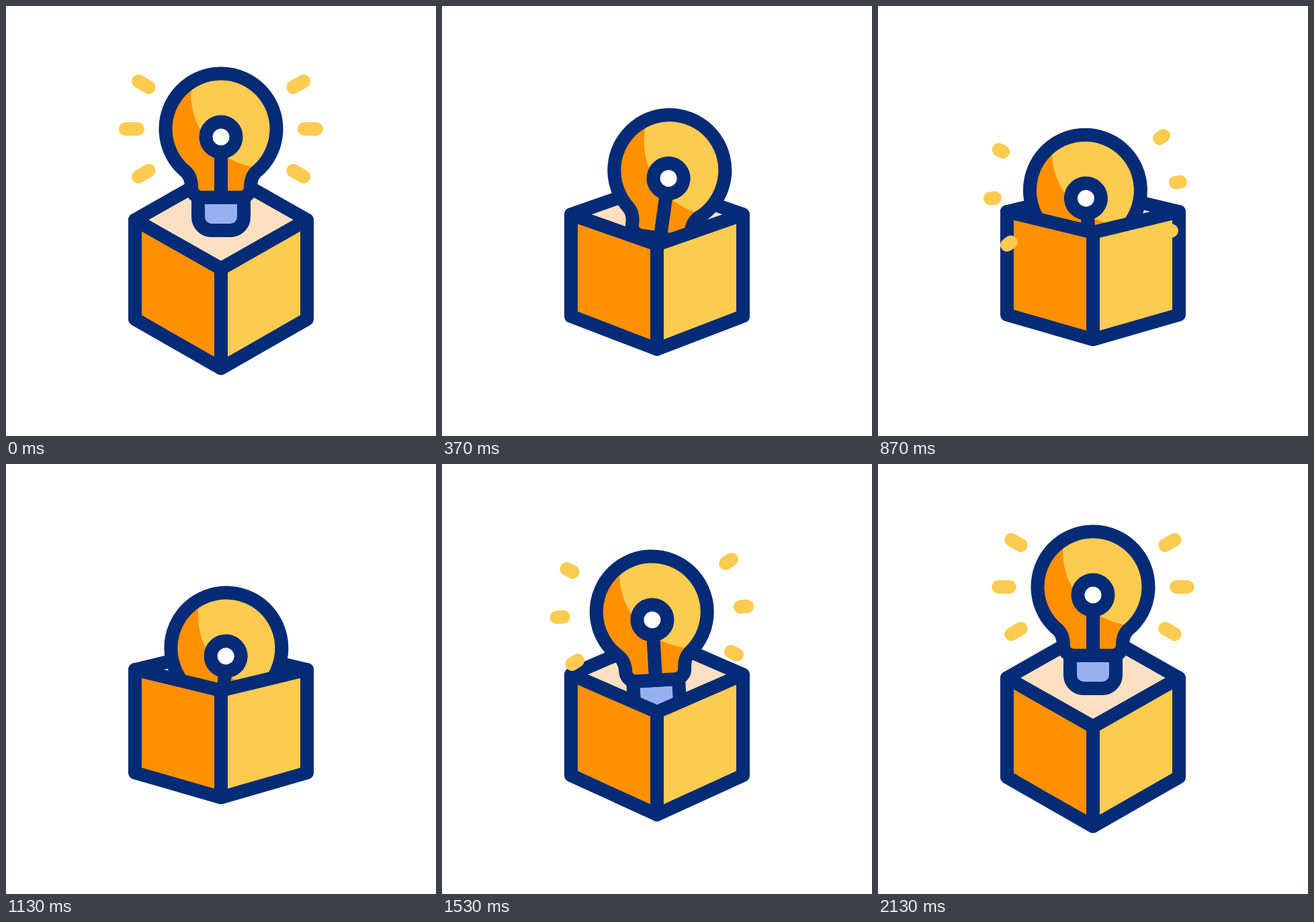
These frames come from a looping animation (640x640 px, 2170 ms). An HTML page:

```html
<!DOCTYPE html>
<html lang="en">
<head>
<meta charset="utf-8">
<title>Idea box</title>
<style>
  html, body { margin: 0; width: 100%; height: 100%; overflow: hidden; background: #fff; }
  svg { display: block; width: 100%; height: 100%; }
  .line { stroke: #042b76; stroke-width: 20; stroke-linejoin: round; stroke-linecap: round; }
  .none { fill: none; }
  .yellow { fill: #fdcb50; }
  .orange { fill: #ff9100; }
  .peach { fill: #fde0c2; }
  .blue { fill: #96b0f1; }
  .white { fill: #fff; }
  #rays { stroke: #fdcb50; stroke-width: 20; stroke-linecap: round; }
</style>
</head>
<body>
<svg viewBox="0 0 640 640">
  <defs>
    <path id="glass" d="M267 246.2A82.5 82.5 0 1 1 373 246.2C368 250.5 364 259 364 270A15 15 0 0 1 349 285H291A15 15 0 0 1 276 270C276 259 272 250.5 267 246.2Z"/>
    <clipPath id="inside"><use href="#glass"/></clipPath>
  </defs>
  <path id="top" class="line peach"/>
  <g id="bulb">
    <path class="line blue" d="M286 285V314A20 20 0 0 0 306 334H334A20 20 0 0 0 354 314V285Z"/>
    <use href="#glass" class="orange"/>
    <circle class="yellow" cx="386" cy="130" r="111" clip-path="url(#inside)"/>
    <use href="#glass" class="line none"/>
    <path class="line" d="M320 220V285"/>
    <circle class="line white" cx="320" cy="195" r="22.5"/>
  </g>
  <path id="left" class="line orange"/>
  <path id="right" class="line yellow"/>
  <g id="rays"></g>
</svg>
<script>
const LOOP = 2170, FPS = 30, LAST = 64;
const $ = id => document.getElementById(id);
const clamp = u => Math.min(1, Math.max(0, u));
const smooth = u => u * u * (3 - 2 * u);
const span = (f, a, b) => clamp((f - a) / (b - a));

// Cubic Bézier easing, solved by bisection
function bezier(x1, y1, x2, y2) {
  const at = (s, a, b) => 3 * a * s * (1 - s) ** 2 + 3 * b * s * s * (1 - s) + s ** 3;
  return x => {
    let lo = 0, hi = 1;
    for (let i = 0; i < 24; i++) {
      const mid = (lo + hi) / 2;
      if (at(mid, x1, x2) < x) lo = mid; else hi = mid;
    }
    return at((lo + hi) / 2, y1, y2);
  };
}

const sink = bezier(.167, .167, .667, 1);
const rise = bezier(.42, 0, .58, 1);

// [frame, degrees]
const swing = [[0, 0], [11, 8], [22.4, -8], [33, 3.5], [44, -3.6], [55, 0]];

// Ray bursts: grow from, grow to, shrink from, shrink to
const bursts = [[-6, 0, 0, 5], [15.8, 22, 22, 29], [36, 42, 41, 52], [59, 65, 65, 70]];

const rays = [0, 30, 150, 180, 210, 330].map(angle => {
  const ray = document.createElementNS('http://www.w3.org/2000/svg', 'line');
  ray.setAttribute('transform', `translate(320 183) rotate(${angle})`);
  return $('rays').appendChild(ray);
});

function tiltAt(f) {
  let angle = 0;
  for (let i = 1; i < swing.length; i++) {
    const [a, from] = swing[i - 1], [b, to] = swing[i];
    if (f >= a) angle = from + (to - from) * smooth(span(f, a, b));
  }
  return angle;
}

function drawBox(p) {
  const side = 318.4 - 12.3 * p, front = 391 - 54 * p, back = 245.8 + 29.6 * p;
  const low = 466 - 6.5 * p, base = 539.3 - 43 * p;
  const face = x => `M${x} ${side}L320 ${front}V${base}L${x} ${low}Z`;
  $('top').setAttribute('d', `M192 ${side}L320 ${back}L448 ${side}L320 ${front}Z`);
  $('left').setAttribute('d', face(192));
  $('right').setAttribute('d', face(448));
}

function drawRays(f) {
  const burst = bursts.find(b => f >= b[0] && f < b[3]);
  let inner = 0, outer = 0;
  if (burst) {
    outer = 124 + 18 * smooth(span(f, burst[0], burst[1]));
    inner = 124 + 18 * smooth(span(f, burst[2], burst[3]));
  }
  $('rays').style.display = outer > inner ? '' : 'none';
  for (const ray of rays) {
    ray.setAttribute('x1', inner);
    ray.setAttribute('x2', outer);
  }
}

function draw(ms) {
  const f = Math.min(LAST, Math.floor((ms % LOOP + 3.4) * FPS / 1000));
  const p = sink(span(f, 0, 21)) - rise(span(f, 36, 54));
  const pose = `translate(0 ${90.8 * p}) rotate(${tiltAt(f)} 320 318)`;
  $('bulb').setAttribute('transform', pose);
  $('rays').setAttribute('transform', pose);
  drawBox(p);
  drawRays(f);
}

const start = performance.now();
function tick() {
  draw(performance.now() - start);
  requestAnimationFrame(tick);
}
tick();
</script>
</body>
</html>
```
